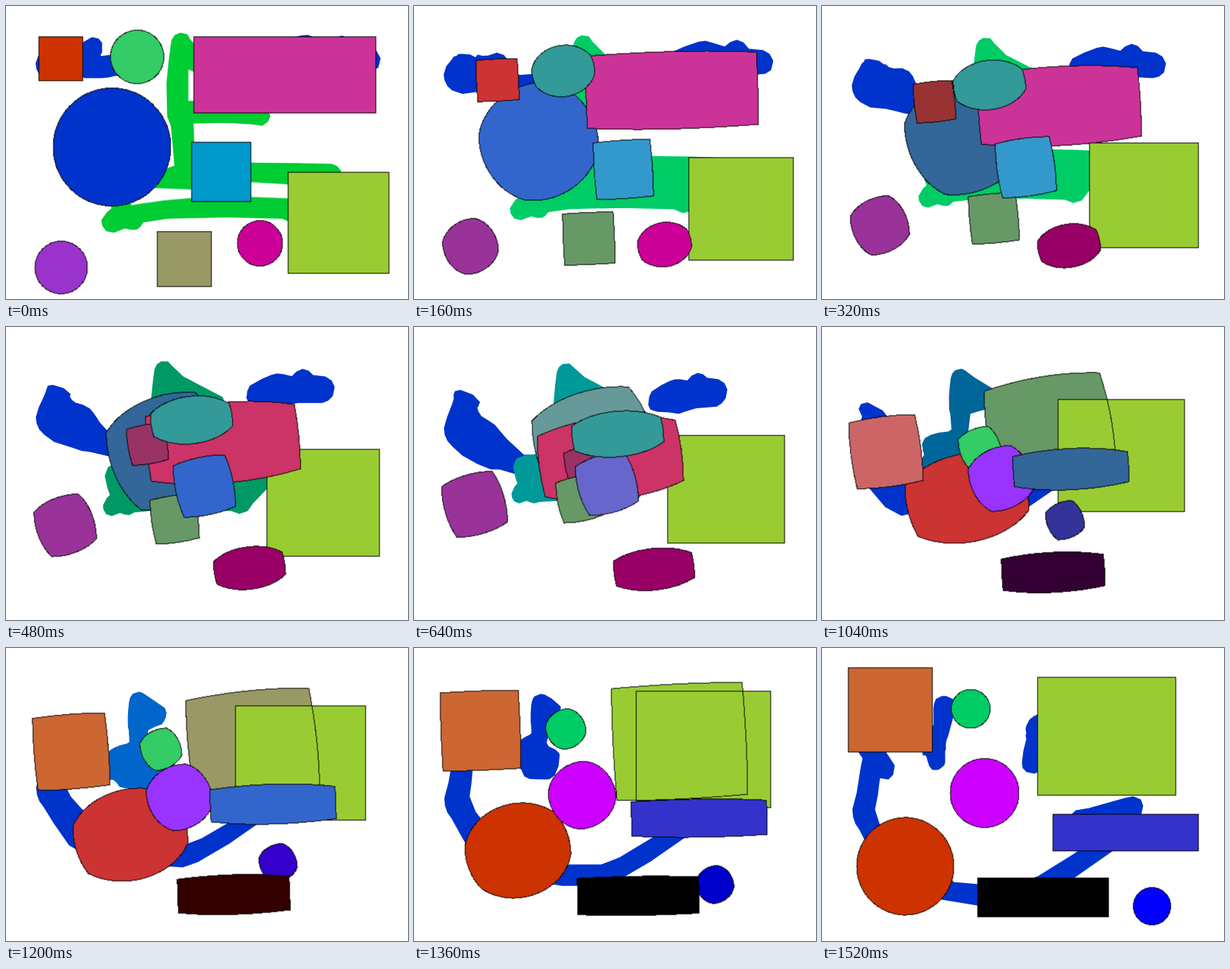
Write an HTML page without scripts that moves like this. It is 550 by 400 pixels and loops after 1600 ms.

```html
<!DOCTYPE html>
<html lang="en">
<head>
<meta charset="utf-8">
<title>Shape morph</title>
<style>
html, body { margin: 0; width: 100%; height: 100%; overflow: hidden; background: #fff; }
svg { display: block; width: 550px; height: 400px; }
path { animation: 1.6s steps(20, jump-none) infinite, 1.6s step-end infinite; }
.brush { color: #03c; fill: currentColor; stroke: currentColor; stroke-width: 2; stroke-linejoin: round; }
.outlined { stroke: #000; stroke-width: 1; shape-rendering: crispEdges; }

.blueLeft { animation-name: blueLeft; }
.blueRight { animation-name: blueRight; }
.scribble { animation-name: scribble, scribbleColor; }
.gaps { fill: #fff; animation-name: none, gaps; }
.bigDisc { animation-name: bigDisc, bigDiscFill; }
.lime { fill: #9c3; animation-name: lime; }
.banner { animation-name: banner, bannerFill; }
.redBox { animation-name: redBox, redBoxFill; }
.khaki { animation-name: khaki, khakiFill; }
.cyan { animation-name: cyan, cyanFill; }
.greenDisc { animation-name: greenDisc, greenDiscFill; }
.magenta { animation-name: magenta, magentaFill; }
.purple { animation-name: purple, purpleFill; }

/* Outlines: corners and round arcs pair up by distance along the edge */
@keyframes redBox {
  from { d: path("m44 41c20 0 40 0 60 0 0 20 0 40 0 60-20 0-40 0-60 0 0-20 0-40 0-60z"); }
  to { d: path("m425.5 352c0-14.1 11.4-25.5 25.5-25.5 14.1 0 25.5 11.4 25.5 25.5 0 14.1-11.4 25.5-25.5 25.5-14.1 0-25.5-11.4-25.5-25.5z"); }
}
@keyframes khaki {
  from { d: path("m206 307c25 0 49 0 74 0 0 25 0 50 0 75-25 0-49 0-74 0 0-25 0-50 0-75z"); }
  to { d: path("m176.5 82.5c0-14.6 11.9-26.5 26.5-26.5 14.6 0 26.5 11.9 26.5 26.5 0 14.6-11.9 26.5-26.5 26.5-14.6 0-26.5-11.9-26.5-26.5z"); }
}
@keyframes cyan {
  from { d: path("m253 185c27 0 54 0 81 0 0 27 0 54 0 81-27 0-54 0-81 0 0-27 0-54 0-81z"); }
  to { d: path("m175 197.5c0-26 21-47 47-47 26 0 47 21 47 47 0 26-21 47-47 47-26 0-47-21-47-47z"); }
}
@keyframes purple {
  from { d: path("m39 356.5c0-19.9 16.1-36 36-36 19.9 0 36 16.1 36 36 0 19.9-16.1 36-36 36-19.9 0-36-16.1-36-36z"); }
  to { d: path("m35 26c38 0 77 0 115 0 0 38 0 77 0 115-38 0-77 0-115 0 0-38 0-77 0-115z"); }
}
@keyframes lime {
  from { d: path("m385 226h138v138h-138z"); }
  to { d: path("m294 39h189v161h-189z"); }
}
@keyframes bigDisc {
  from { d: path("m64 192c0-48.5 42.5-86 90.6-79.9 40.3 5.1 70.4 39.3 70.4 79.9 0 48.5-42.5 86-90.6 79.9-40.3-5.1-70.4-39.3-70.4-79.9z"); }
  to { d: path("m294 39c63 0 126 0 189 0 0 54 0 107 0 161-63 0-126 0-189 0 0-54 0-107 0-161z"); }
}
@keyframes greenDisc {
  from { d: path("m142.5 69c0-35.3 45.2-50 66-21.5 4.6 6.2 7 13.8 7 21.5 0 35.3-45.2 50-66 21.5-4.6-6.2-7-13.8-7-21.5z"); }
  to { d: path("m315 226c66 0 133 0 199 0 0 17 0 33 0 50-66 0-133 0-199 0 0-17 0-33 0-50z"); }
}
@keyframes banner {
  from { d: path("m256 41c83 0 166 0 249 0 0 35 0 69 0 104-83 0-166 0-249 0 0-35 0-69 0-104z"); }
  to { d: path("m47 297.5c0-54.9 62.7-86.1 106.5-53.1 16.7 12.6 26.5 32.2 26.5 53.1 0 54.9-62.7 86.1-106.5 53.1-16.7-12.6-26.5-32.2-26.5-53.1z"); }
}
@keyframes magenta {
  from { d: path("m316 323.5c0-28.6 35.6-42 54.4-20.4 4.9 5.7 7.6 12.9 7.6 20.4 0 28.6-35.6 42-54.4 20.4-4.9-5.7-7.6-12.9-7.6-20.4z"); }
  to { d: path("m212 313c60 0 119 0 179 0 0 18 0 35 0 53-60 0-119 0-179 0 0-18 0-35 0-53z"); }
}

/* Brush scribbles */
@keyframes blueLeft {
  from { d: path("M65 59 75 58 82 60 80 60 84 57 88 54 95 53 105 50 117 43 126 45 130 50 130 62 127 69 145 67 155 66 165 66 170 70 172 72 165 74 166 72 168 70 172 70 176 72 178 75 178 80 172 86 165 90 155 92 150 94 153 93 140 96 130 97 120 97 125 97 107 97 100 92 88 92 66 100 52 98 46 93 42 85 41 78 44 69 52 62 54 60 61 60 61 59z"); }
  to { d: path("M60 124 85 140 98 160 96 172 90 178 78 176 75 200 71 220 79 245 87 256 95 265 122 280 180 320 215 323 268 323 295 312 345 281 385 251 341 228 347 222 365 219 415 205 425 203 435 207 438 215 435 228 420 254 398 275 345 312 290 344 268 352 248 350 212 350 163 342 130 325 112 332 86 315 66 276 52 248 46 239 43 230 42 220 48 197 53 165 56 150 46 135 50 127z"); }
}
@keyframes blueRight {
  from { d: path("M355 69 356 62 360 56 380 48 402 41 412 40 424 44 442 50 450 44 459 41 468 45 476 55 497 57 506 62 511 71 508 83 500 87 490 87 442 80 414 83 405 83 390 75 370 75 359 74z"); }
  to { d: path("M274 156 276 140 278 132 280 124 279 119 280 116 279 110 280 106 284 98 289 94 293 92 296 90 304 92 310 97 312 104 311 115 310 125 308 135 307 150 306 158 303 164 290 170 280 168 275 163z"); }
}
@keyframes scribble {
  from { d: path("M227 46 231 40 238 37 247 39 251 46 271 67 348 105 358 143 360 150 357 157 350 162 335 160 300 158 255 159 257 205 300 214 400 215 445 216 452 219 457 225 445 250 415 279 405 292 392 295 378 289 300 287 220 289 187 294 183 300 178 304 170 304 162 302 147 308 137 306 132 299 131 292 138 282 145 276 140 263 134 240 139 225 156 220 182 220 218 223 231 218 226 163 221 150 220 105 223 75 226 52z"); }
  to { d: path("M153 82 154 75 156 70 164 66 169 66 178 70 181 76 181 74 180 73 180 77 179 82 179 88 178 92 177 98 171 120 169 125 168 130 168 135 168 138 167 140 167 150 167 155 166 159 160 164 157 165 152 165 150 164 147 160 145 154 144 150 143 147 141 145 138 145 138 142 138 140 138 137 138 130 138 127 138 125 139 122 142 118 146 114 149 110 152 106 153 104 153 98 153 95 153 90 153 86 153 84z"); }
}

/* Colours jump in web-palette steps; 5% is one step */
@keyframes gaps { 0% { opacity: 1 } 5%, to { opacity: 0 } }
@keyframes scribbleColor { 0% { color: #0c3 } 10% { color: #0c6 } 25% { color: #096 } 35% { color: #099 } 60% { color: #069 } 70% { color: #06c } 80%, to { color: #03c } }
@keyframes bigDiscFill { 0% { fill: #03c } 10% { fill: #36c } 20% { fill: #369 } 35% { fill: #699 } 50% { fill: #696 } 70% { fill: #996 } 80% { fill: #9c6 } 85%, to { fill: #9c3 } }
@keyframes bannerFill { 0% { fill: #c39 } 25% { fill: #c36 } 50% { fill: #c33 } 80%, to { fill: #c30 } }
@keyframes redBoxFill { 0% { fill: #c30 } 10% { fill: #c33 } 15% { fill: #933 } 30% { fill: #936 } 45% { fill: #636 } 50% { fill: #639 } 65% { fill: #339 } 70% { fill: #30c } 85% { fill: #00c } 90%, to { fill: #00f } }
@keyframes khakiFill { 0% { fill: #996 } 10% { fill: #696 } 50% { fill: #3c6 } 80%, to { fill: #0c6 } }
@keyframes cyanFill { 0% { fill: #09c } 10% { fill: #39c } 25% { fill: #36c } 35% { fill: #66c } 50% { fill: #66f } 55% { fill: #96f } 60% { fill: #93f } 80% { fill: #90f } 85%, to { fill: #c0f } }
@keyframes greenDiscFill { 0% { fill: #3c6 } 10% { fill: #399 } 50% { fill: #369 } 70% { fill: #36c } 85%, to { fill: #33c } }
@keyframes magentaFill { 0% { fill: #c09 } 15% { fill: #909 } 20% { fill: #906 } 45% { fill: #606 } 50% { fill: #603 } 60% { fill: #303 } 75% { fill: #300 } 85%, to { fill: #000 } }
@keyframes purpleFill { 0% { fill: #93c } 10% { fill: #939 } 45% { fill: #936 } 50% { fill: #c36 } 60% { fill: #c66 } 75%, to { fill: #c63 } }
</style>
</head>
<body>
<svg viewBox="0 0 550 400">
  <g transform="translate(.5 .5)">
    <path class="brush blueLeft"/>
    <path class="brush blueRight"/>
    <path class="brush scribble"/>
    <path class="gaps" d="M249 86 262 92 330 129 249 129zM180 240 200 248 253 250 290 247 335 240 385 243 410 244 410 262 385 262 330 260 260 261 215 265 172 271 165 266z"/>
    <g class="outlined">
      <path class="bigDisc"/>
      <path class="lime"/>
      <path class="bigDisc" fill-opacity="0"/>
      <path class="banner"/>
      <path class="redBox"/>
      <path class="khaki"/>
      <path class="cyan"/>
      <path class="greenDisc"/>
      <path class="magenta"/>
      <path class="purple"/>
    </g>
  </g>
</svg>
</body>
</html>
```
